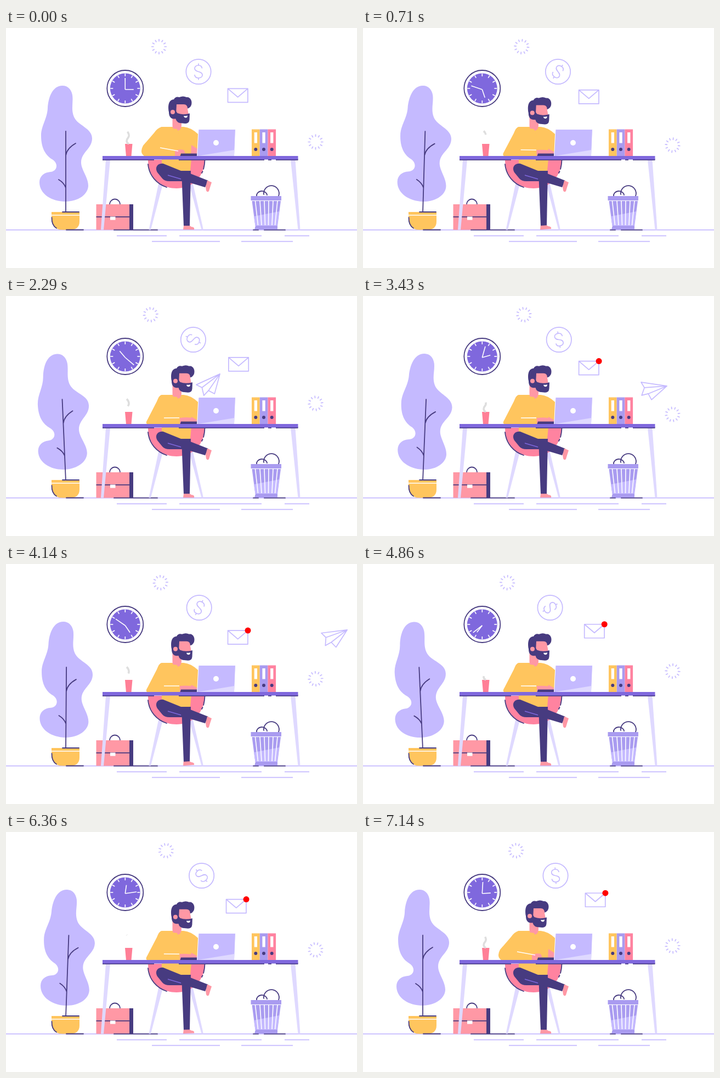
Write an HTML page that moves like this. It is 640x437 px and loops after 7210 ms.

```html
<!DOCTYPE html>
<html lang="en">
<head>
<meta charset="utf-8">
<title>Office desk</title>
<style>
  html, body { margin: 0; width: 100%; height: 100%; overflow: hidden; background: #fff; }
  svg { display: block; width: 100vw; height: 100vh; }
  .line { fill: none; stroke: #c5baff; stroke-width: 1.7; stroke-linejoin: round; }
  .ink { fill: none; stroke: #473b80; stroke-width: 1.8; stroke-linecap: round; }
  .white { fill: none; stroke: #fff; stroke-width: 1.6; }
  .dark { fill: #473b80; }
  .skin { fill: #ff98a5; }
  .shirt { fill: #ffc55e; }
  .lilac { fill: #c5baff; }
  .pale { fill: #dfd9ff; }
</style>
</head>
<body>
<svg viewBox="0 0 640 437">
  <!-- Floor -->
  <path class="line" d="M0 367.7H640M202 378.3H293M316 378.3H466M508 378.3H553M266 388.7H390M429 388.7H523"/>

  <!-- Plant -->
  <g id="plant">
    <path class="lilac" d="M103 105C84 105 77 128 76 146C75 166 64 178 64 196C64 220 73 232 84 239C97 247 93 261 81 262C69 263 61 270 61 281C61 302 83 316 108 316C133 316 150 302 150 287C150 272 137 258 137 245C137 226 157 220 157 201C157 182 131 178 124 162C118 148 123 136 121 122C119 111 112 105 103 105Z"/>
    <path class="ink" d="M109 188V335M109 232Q111 219 127 210M109 291Q106 282 96 276"/>
  </g>
  <path class="shirt" d="M83 335H134V340H83ZM83 341.5H134V352Q134 367.5 117 367.5H103Q83 367.5 83 345Z"/>
  <path class="ink" d="M103 335H133M83.500 345Q83 359 92 364.500M110 367.500H141"/>

  <!-- Briefcase -->
  <path class="ink" d="M189 321A9.500 9.500 0 0 1 208 321"/>
  <path class="skin" d="M164.500 321H225V367.500H164.500Z"/>
  <path class="dark" d="M225 321H232V367.500H225ZM164.500 343H225V344.700H164.500Z"/>
  <path fill="#fff" d="M190 343.500H199.500V349.500H190Z"/>
  <path class="ink" d="M197 367.700H276"/>

  <!-- Bin -->
  <g class="ink">
    <path d="M457 306A9.500 8 0 0 1 476 304M470 303A14 14 0 1 1 497 306"/>
    <path d="M451 367.700H460M471 367.700H509"/>
  </g>
  <g fill="#a99bf0">
    <path d="M446.500 306H502V314H446.500ZM448.500 315H501L495 360H454.500ZM455 360H495V367H453Z"/>
    <path class="lilac" d="M452 343L498 334L494.500 360H454.500Z"/>
  </g>
  <path class="white" d="M454.500 315L459.500 359M463 315L466 359M471 315L472.500 359M479 315L478.500 359M487 315L485 359M495 315L490.500 359"/>

  <!-- Chair -->
  <path class="pale" d="M278 284H286L264 367.500H260.500ZM334 284H341L360 367.500H356.500Z"/>
  <path fill="#ff83a0" d="M259 240C259 274 284 292 311 292C339 292 362 272 362 240Z"/>
  <path class="ink" d="M259 248C261 269 275 284 293 290M362.500 241Q362 250 360 257M358.500 261L357 264"/>

  <!-- Seated man -->
  <path class="shirt" d="M284 238H338L336 260L314 262L284 252Z"/>
  <path class="dark" d="M320 260H337L335 360.500H324Z"/>
  <path class="dark" d="M287 247L319 260H336V265L369 278L363 290L326 279H298Q289 279 285 274L276 263C270 253 278 245 287 247Z"/>
  <path d="M295 268L319 275" fill="none" stroke="#7f68dd" stroke-width="1.600"/>
  <path class="skin" d="M367 277.500L375 281Q372 290 370 297Q367 300 365 296L364 289Z"/>
  <path id="foot" class="skin" d="M324 360H335Q338 362.500 341 362.500Q344 364 343 367H323Z"/>
  <path class="shirt" d="M284 180H324Q337 181 350 193V234H277L276 194Q278 181 284 180Z"/>
  <path id="farArm" class="skin"/>
  <path class="skin" d="M303.500 162H320V178Q319 187 311.500 187Q303.500 187 303.500 178Z"/>
  <g id="head">
    <path class="dark" d="M311 165C302 167 297 163 297 153C295 142 296 131 306 130Q309 124 316 126Q323 123 329 126C337 125 340 134 338 140Q336 146 329 147L320 155L311 157Z"/>
    <path class="skin" d="M311 139H324Q331 139 331 147L333 158H310Z"/>
    <path class="dark" d="M309 150L312.500 155Q322 159 335 155.500L334.500 167Q334 174 327 174L317 173Q309 171 309 161Z"/>
    <circle class="skin" cx="304" cy="153" r="4"/>
    <path fill="#fff" d="M324 160Q327 160.500 331 159.500Q331 163.500 327.500 163.500Q324.500 163 324 160Z"/>
  </g>
  <path id="sleeve" class="shirt"/>
  <path id="hand" class="skin"/>
  <path id="cuffLine" class="white"/>

  <!-- Paper plane, launched from behind the laptop -->
  <path id="plane" class="line" d="M0 0L-47 -7L-41 3L-46 17L-34 14L-28 25ZM-41 3L0 0L-34 14"/>

  <!-- Laptop -->
  <path class="dark" d="M319 228.500H349V233H317.500Z"/>
  <path class="lilac" stroke="#fff" d="M351 184.500H418.500L416.500 233.500H348.500Z"/>
  <path class="pale" d="M350 233L416.500 222L416 233Z"/>
  <circle cx="383" cy="209" r="5" fill="#fff"/>

  <!-- Binders and cup -->
  <g id="binders"></g>
  <path fill="#ff7f96" d="M217 211H230.500L228.500 233.500H219Z"/>
  <path id="steam" fill="none" stroke="#dedede" stroke-width="3.600" pathLength="1" d="M224 211C218 208 220 203 222.500 200C226 196 223 190 220 187.500"/>

  <!-- Desk -->
  <path class="pale" d="M182 240H190L178 367.500H173ZM519 240H527.500L536.500 367.500H532.500Z"/>
  <path class="dark" d="M176 238H270V241H176ZM315 238H471V241H315ZM478 238H484V241H478ZM492 238H532.500V241H492Z"/>
  <path fill="#7f68dd" d="M176 233H532.500V239.500H176Z"/>

  <!-- Clock -->
  <circle cx="217.300" cy="110" r="33" class="ink"/>
  <circle cx="217.300" cy="110" r="27.500" fill="#7f68dd"/>
  <g id="ticks" class="white" transform="translate(217.300 110)"></g>
  <path id="minuteHand" class="white" d="M0 0V-21"/>
  <path id="hourHand" class="white" d="M0 0V-15.500"/>

  <!-- Floating icons -->
  <g id="sunA" class="line"></g>
  <g id="sunB" class="line"></g>
  <g id="coin" class="line">
    <circle r="22.700"/>
    <path id="dollar" d="M6.500 -6C6 -10 3 -11.500 0 -11.500C-4.500 -11.500 -7 -9 -7 -6C-7 2 7 -2 7 6C7 9 4.500 11.500 0 11.500C-4 11.500 -7 9.500 -7 5.500M0 -11.500V-15M0 11.500V15"/>
  </g>
  <g id="mail">
    <path class="line" d="M-18.200 -12.500H18.200V12.500H-18.200ZL0 3L18.200 -12.500"/>
    <circle id="badge" r="5.500" fill="#f00"/>
  </g>
</svg>

<script>
const LOOP = 7210;
const part = Object.fromEntries([...document.querySelectorAll('[id]')].map(el => [el.id, el]));
const place = (id, x, y, angle = 0, scale = 1) =>
  part[id].setAttribute('transform', `translate(${x} ${y}) rotate(${angle}) scale(${scale})`);
const shape = (id, d) => part[id].setAttribute('d', d);
const clamp = v => Math.min(1, Math.max(0, v));
const ease = v => (1 - Math.cos(Math.PI * clamp(v))) / 2;
const mix = (a, b, v) => a + (b - a) * v;

const spokes = (inner, outer) => Array.from({ length: 12 }, (_, i) =>
  `<path d="M0 ${-inner}V${-outer}" transform="rotate(${i * 30})"/>`).join('');
part.ticks.innerHTML = spokes(22, 27);
part.sunA.innerHTML = part.sunB.innerHTML = spokes(9.5, 14);
part.binders.innerHTML = ['#ffc55e', '#a99bf0', '#ff83a0'].map((color, i) =>
  `<g transform="translate(${448 + i * 14.7} 0)"><path fill="${color}" d="M0 184.500H14.700V233.500H0Z"/>
   <path fill="#fff" d="M4.700 190H10V209.500H4.700Z"/><circle class="dark" cx="7.300" cy="221" r="3"/></g>`).join('');

// Swings 0, 1, -1, 1, -1, 1, 0 with equal, eased steps.
const swayStops = [0, 1, -1, 1, -1, 1, 0];
function sway(t) {
  const step = t / (LOOP / 6), i = Math.floor(step);
  return mix(swayStops[i], swayStops[i + 1], ease(step - i));
}

// Bezier legs of the flight of the plane's tip: start, end, points.
const flight = [
  [1900, 2290, [386, 190], [380, 172], [380, 154], [390, 142]],
  [2290, 3430, [390, 142], [425, 100], [507, 178], [554, 164]],
  [3430, 4140, [554, 164], [582, 155.5], [600, 134], [622, 120]],
  [4140, 4900, [622, 120], [644, 106], [670, 90], [700, 71]]
];
function drawPlane(t) {
  const leg = flight.find(([start, end]) => t >= start && t < end);
  part.plane.style.display = leg ? '' : 'none';
  if (!leg) return;
  const [start, end, a, b, c, d] = leg, u = (t - start) / (end - start), v = 1 - u;
  const at = k => v ** 3 * a[k] + 3 * v * v * u * b[k] + 3 * v * u * u * c[k] + u ** 3 * d[k];
  const slope = k => v * v * (b[k] - a[k]) + 2 * v * u * (c[k] - b[k]) + u * u * (d[k] - c[k]);
  const heading = Math.atan2(slope(1), slope(0)) * 180 / Math.PI;
  place('plane', at(0), at(1), heading + 17);
}

function drawMan(t) {
  const lean = ease((t - 200) / 600) - ease((t - 6300) / 700);
  const m = (a, b) => mix(a, b, lean);
  const tap = lean * 0.8 * Math.sin(t / 55);
  place('head', m(0, 5), m(0, 1.7));
  shape('sleeve', `M284 180Q${m(276, 279)} ${m(182, 181)} ${m(270, 275)} ${m(191, 192)}
    L${m(250, 258)} ${m(214, 225)}Q${m(243, 254)} ${m(227, 231)} ${m(252, 257)} 233
    H${m(309, 318)}V${m(223, 222)}L318 200L312 184Z`);
  shape('hand', `M${m(308, 317)} ${m(223, 222)}Q${m(318, 328)} ${m(220, 221) + tap} ${m(324, 336)} ${m(222, 222) + tap}
    L${m(327, 344)} ${m(228, 229) + tap}H${m(318, 322)}L${m(317, 318)} 233H${m(308, 317)}Z`);
  shape('farArm', `M${m(338, 338)} ${m(213, 220)}L349 ${m(220, 226)}V233H${m(337, 334)}Z`);
  shape('cuffLine', `M${m(281, 288)} ${m(218, 222)}L${m(314, 316)} ${m(224, 222) + tap / 2}`);
  const lift = Math.max(0, 0.4 - Math.cos(2 * Math.PI * t / (LOOP / 6)));
  part.foot.setAttribute('transform', `rotate(${-3 * lift} 325 366)`);
}

function drawSteam(t) {
  const phase = (0.92 + 8 * t / LOOP) % 2;
  const from = Math.max(0, phase - 1), to = Math.min(1, phase);
  part.steam.setAttribute('stroke-dasharray', `0 ${from} ${to - from} 2`);
}

function draw(t) {
  const s = sway(t), turn = 360 * t / LOOP;
  part.plant.setAttribute('transform', `rotate(${2.6 * s} 108.500 337)`);
  place('sunA', 279 + 16 * s, 34, turn);
  place('sunB', 564.5, 207.5 + (s > 0 ? 9 : 12.5) * s, turn);
  place('coin', 351 + (s > 0 ? 7 : 10) * s, 79.5);
  place('dollar', 0, 0, turn);

  const orbit = (-50 - 3 * turn) * Math.PI / 180;
  place('mail', 418.2 + 7 * Math.cos(orbit), 128.2 + 7 * Math.sin(orbit));
  place('badge', 18.3, -12.5, 0, ease((t - 2900) / 250));

  const clockTurn = 720 * t / 7175;
  place('minuteHand', 217.3, 112, -clockTurn);
  place('hourHand', 217.3, 112, 90 + clockTurn);

  drawPlane(t);
  drawMan(t);
  drawSteam(t);
}

const begin = performance.now();
function frame() {
  draw((performance.now() - begin) % LOOP);
  requestAnimationFrame(frame);
}
frame();
</script>
</body>
</html>
```
